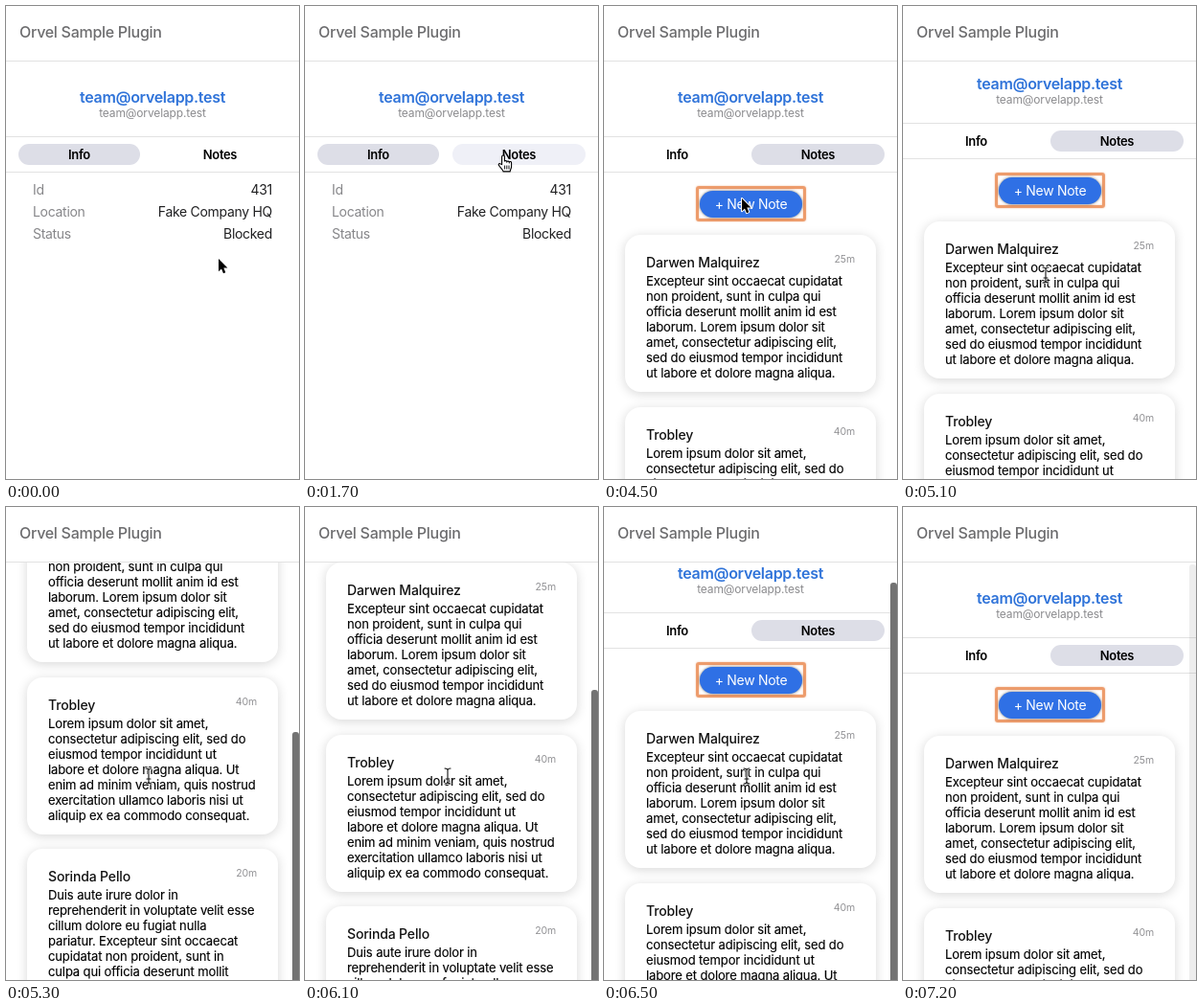
An HTML page for the animation above (7.3 s loop, 306x494 px).

```html
<!DOCTYPE html>
<html lang="en">
<head>
<meta charset="utf-8">
<title>Plugin panel</title>
<style>
  html, body { margin: 0; width: 100%; height: 100%; overflow: hidden; background: #fff; }
  body { font: 14px/16px Inter, Roboto, sans-serif; color: #202022; white-space: nowrap; }
  #stage { position: relative; width: 306px; height: 494px; overflow: hidden; background: #fff; }
  #stage div, #stage svg { position: absolute; box-sizing: border-box; }

  .header { left: 0; top: 0; width: 306px; height: 58px; padding-left: 14px; background: #fff;
    border-bottom: 1px solid #e2e2e2; font: 500 16px/55px Inter, Roboto, sans-serif;
    letter-spacing: -.28px; color: #6c6c6e; }
  #page { left: 0; top: 0; width: 306px; height: 780px; }
  .rule { left: 0; width: 306px; height: 1px; background: #e2e2e2; }
  .mail { left: 0; width: 306px; text-align: center; }
  .mail.big { top: 85px; font-weight: 600; font-size: 16px; line-height: 20px;
    letter-spacing: -.3px; color: #2f73d9; }
  .mail.small { top: 104px; font-size: 12px; letter-spacing: -.13px; color: #8b8b8e; }

  .tab { top: 144px; height: 22px; border-radius: 11px; text-align: center;
    font-weight: 600; font-size: 13px; line-height: 22px; letter-spacing: -.35px; color: #000; }
  .tab.hover { background: #eff0f7; }
  .tab.active { background: #dddee7; }
  #info { left: 13px; width: 127px; }
  #notes { left: 154px; width: 139px; }

  .row { left: 28px; width: 250px; height: 16px; letter-spacing: -.3px; }
  .row span { color: #87878a; }
  .row b { position: absolute; right: 0; font-weight: 400; }

  #ring { left: 96px; top: 188px; width: 115px; height: 37px; border: 3px solid #ed9c6c;
    border-radius: 3px; box-shadow: 0 0 2px rgba(237, 156, 108, .7), inset 0 0 2px rgba(237, 156, 108, .7); }
  .button { left: 100px; top: 193px; width: 107px; height: 28px; border-radius: 14px;
    background: #2f70e5; color: #fff; text-align: center; line-height: 28px;
    letter-spacing: -.3px; box-shadow: 0 0 3px rgba(0, 0, 0, .55); }

  .card { left: 22px; width: 262px; height: 164px; border-radius: 16px; background: #fff;
    box-shadow: 0 2px 12px rgba(0, 0, 0, .16); }
  .name { left: 22px; top: 21px; font-weight: 500; letter-spacing: -.15px; color: #111; }
  .age { right: 22px; top: 18px; font-size: 10.5px; letter-spacing: -.15px; color: #929295; }
  .text { left: 22px; top: 40px; font-size: 13px; letter-spacing: -.12px; color: #000;
    -webkit-text-stroke: .15px #000; }

  #thumb { left: 299px; width: 7px; height: 464px; border-radius: 3px; background: #737373; }
  #cursor { left: 0; top: 0; width: 1px; height: 1px; overflow: visible; }
</style>
</head>
<body>
<div id="stage">
  <div id="page">
    <div class="mail big">team@orvelapp.test</div>
    <div class="mail small">team@orvelapp.test</div>
    <div class="rule" style="top:136px"></div>
    <div class="tab" id="info">Info</div>
    <div class="tab" id="notes">Notes</div>
    <div class="rule" style="top:173px"></div>
    <div id="details">
      <div class="row" style="top:184px"><span>Id</span><b>431</b></div>
      <div class="row" style="top:207px"><span>Location</span><b>Fake Company HQ</b></div>
      <div class="row" style="top:230px"><span>Status</span><b>Blocked</b></div>
    </div>
    <div id="list">
      <div id="ring"></div>
      <div class="button">+ New Note</div>
    </div>
  </div>
  <div class="header">Orvel Sample Plugin</div>
  <div id="thumb"></div>
  <svg id="cursor">
    <g id="arrow">
      <path d="M0 0V13.2L3 10.4L5 15.2L7.3 14.2L5.3 9.6H9.4Z" fill="#000" stroke="#fff"
        stroke-width="2" stroke-linejoin="round" paint-order="stroke"/>
    </g>
    <g id="hand" transform="translate(-5.4 -.6)" stroke="#000" stroke-width="1.1" stroke-linecap="round">
      <path d="M4 10V2a1.4 1.4 0 0 1 2.8 0V7a1.3 1.3 0 0 1 2.5 .3a1.3 1.3 0 0 1 2.4 .5a1.2 1.2 0 0 1 2.3 .5V12c0 2-1 3-1.5 5.5H5.5C5 15.5 2 13 .8 10.8c-.7-1.3 .8-2.3 1.8-1.3Z" fill="#fff"/>
      <path d="M7 11.5v3.2M9.2 11.5v3.2M11.4 11.5v3.2" fill="none" stroke-width=".9"/>
    </g>
    <g id="beam" fill="none" stroke-linecap="round">
      <path stroke="#fff" stroke-width="2.6" d="M-3-8Q0-8 0-6Q0-8 3-8M0-6V6M-3 8Q0 8 0 6Q0 8 3 8M-2 3H2"/>
      <path stroke="#111" stroke-width="1.1" d="M-3-8Q0-8 0-6Q0-8 3-8M0-6V6M-3 8Q0 8 0 6Q0 8 3 8M-2 3H2"/>
    </g>
  </svg>
</div>
<script>
const LOOP = 7300, STEP = 100;
const $ = id => document.getElementById(id);

const cards = [
  ["Darwen Malquirez", "25m", ["Excepteur sint occaecat cupidatat", "non proident, sunt in culpa qui",
    "officia deserunt mollit anim id est", "laborum. Lorem ipsum dolor sit",
    "amet, consectetur adipiscing elit,", "sed do eiusmod tempor incididunt",
    "ut labore et dolore magna aliqua."]],
  ["Trobley", "40m", ["Lorem ipsum dolor sit amet,", "consectetur adipiscing elit, sed do",
    "eiusmod tempor incididunt ut", "labore et dolore magna aliqua. Ut",
    "enim ad minim veniam, quis nostrud", "exercitation ullamco laboris nisi ut",
    "aliquip ex ea commodo consequat."]],
  ["Sorinda Pello", "20m", ["Duis aute irure dolor in", "reprehenderit in voluptate velit esse",
    "cillum dolore eu fugiat nulla", "pariatur. Excepteur sint occaecat",
    "cupidatat non proident, sunt in", "culpa qui officia deserunt mollit",
    "anim id est laborum."]]
];

$("list").insertAdjacentHTML("beforeend", cards.map(([name, age, lines], i) =>
  `<div class="card" style="top:${239 + i * 179.5}px">
    <div class="name">${name}</div><div class="age">${age}</div>
    <div class="text">${lines.join("<br>")}</div>
  </div>`).join(""));

// Rows are [time, value, ...]
const pointer = [
  [100, 222, 264], [400, 229, 225], [800, 209, 160], [1300, 207, 156], [2300, 207, 156],
  [3200, 140, 221], [3600, 140, 221], [4300, 144, 201], [4500, 144, 201], [4900, 149, 281]
];
const scroll = [
  [5000, 0], [5100, 14], [5200, 140], [5300, 241], [5400, 246], [5800, 246],
  [5900, 240], [6000, 220], [6300, 102], [6500, 26], [6600, 0]
];
const thumbFade = [[6600, 1], [7200, .13]];

const linear = p => p;
const smooth = p => p * p * (3 - 2 * p);

function at(keys, t, ease = linear) {
  const next = keys.findIndex(k => k[0] > t);
  if (next < 0) return keys[keys.length - 1].slice(1);
  if (next === 0) return keys[0].slice(1);
  const a = keys[next - 1], b = keys[next];
  const p = ease((t - a[0]) / (b[0] - a[0]));
  return a.slice(1).map((v, i) => v + (b[i + 1] - v) * p);
}

const show = (id, on) => { $(id).style.display = on ? "" : "none"; };

function cursorShape(t) {
  if (t >= 6800) return "";
  if (t >= 4800) return "beam";
  return t >= 1500 && t < 2600 ? "hand" : "arrow";
}

function draw(t) {
  const onNotes = t >= 1900;
  $("info").classList.toggle("active", !onNotes);
  $("notes").classList.toggle("active", onNotes);
  $("notes").classList.toggle("hover", t >= 1500 && !onNotes);
  show("details", !onNotes);
  show("list", onNotes);
  show("ring", t >= 3900);

  const [y] = at(scroll, t);
  $("page").style.top = -y + "px";
  show("thumb", t >= 5200);
  $("thumb").style.top = 60 + y * .726 + "px";
  $("thumb").style.opacity = at(thumbFade, t)[0];

  const [cx, cy] = at(pointer, t, smooth);
  $("cursor").style.transform = `translate(${cx}px, ${cy}px)`;
  const shape = cursorShape(t);
  for (const id of ["arrow", "hand", "beam"]) show(id, id === shape);
}

const start = performance.now();
function tick() {
  const t = (performance.now() - start) % LOOP;
  draw(Math.floor(t / STEP) * STEP);
  requestAnimationFrame(tick);
}
tick();
</script>
</body>
</html>
```
